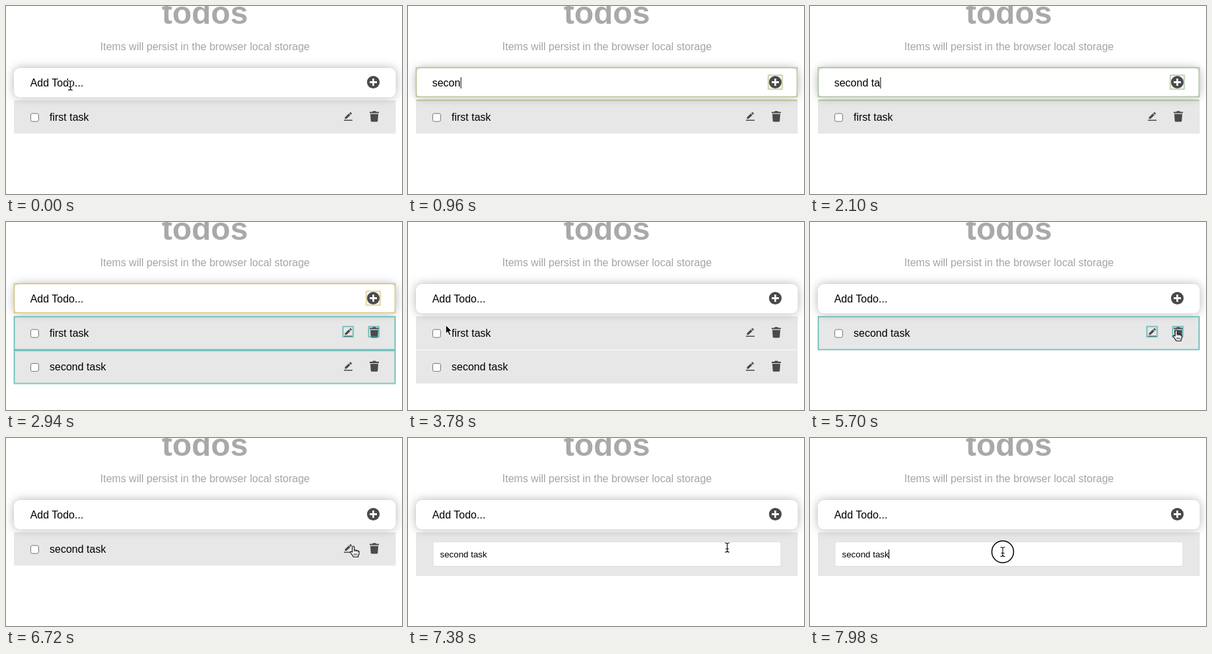
Write an HTML page that moves like this. It is 600 by 285 pixels and loops after 8000 ms.

```html
<!DOCTYPE html>
<html lang="en">
<head>
<meta charset="utf-8">
<title>todos</title>
<style>
  html, body { margin: 0; width: 100%; height: 100%; overflow: hidden; background: #fff; }
  svg { display: block; width: 600px; height: 285px; }
  text { font: 16px "Liberation Sans", Arial, sans-serif; white-space: pre; }
  .title { font-size: 48px; font-weight: bold; fill: #a9a9a9; }
  .sub { fill: #a4a4a4; }
  .edit { font-size: 13.333px; }
  .done { font-style: italic; fill: #a4a4a4; text-decoration: line-through; }
  .card { fill: #fff; filter: drop-shadow(0 0 7px rgba(0, 0, 0, .3)); }
  .row { fill: #e7e7e7; }
  .icon { fill: #4a4a4a; }
</style>
</head>
<body>
<svg viewBox="0 0 600 285">
  <text class="title" x="301.3" y="27" text-anchor="middle">todos</text>
  <text class="sub" x="301.5" y="67" text-anchor="middle">Items will persist in the browser local storage</text>
  <g id="list"></g>
  <rect class="card" x="12" y="94" width="578.5" height="44.5" rx="9"/>
  <g id="form"></g>
  <g id="rows"></g>
  <g id="marks"></g>
  <g id="pointer"></g>
</svg>
<script>
const LOOP = 8000, TICK = 60, HOLD = 300, ROW_STEP = 51.4;
const HEAT = ['#37afa9', '#63b19e', '#80b393', '#97b488', '#abb67d', '#beb771', '#cfb965'];

const TYPED = 'second task';
const KEYS = [540, 660, 780, 900, 960, 1560, 1740, 1920, 2100, 2280, 2580];
const ENTER = 2880, CHECK = 4140, REMOVE = 5640, EDIT = 6960, FOCUS = 7860;
const ROW_HITS = [ENTER, CHECK, REMOVE, EDIT];
const CLICKS = [[240, 480], [4020, 4200], [5580, 5690], [6780, 6960], [7860, 8000]];

// pointer stops: time, x, y
const PATH = [
  [0, 97.5, 120.5], [3240, 97.5, 120.5], [4020, 45.5, 166.5], [4740, 45.5, 166.5],
  [5100, 230, 189], [5520, 555, 164.5], [6100, 555, 164.5], [6660, 526.5, 164.5],
  [7200, 526.5, 164.5], [7860, 292, 172.5], [8000, 292, 172.5]
];

const BEAM = 'M-3-7Q0-7 0-5Q0-7 3-7M0-5V5M-3 7Q0 7 0 5Q0 7 3 7M-2 2H2';
const SHAPES = {
  beam: `<g fill="none" stroke-linecap="round">
    <path d="${BEAM}" stroke="#fff" stroke-width="3"/>
    <path d="${BEAM}" stroke="#000" stroke-width="1.1"/></g>`,
  arrow: '<path d="M0 0V13.2L3 10.5L5.2 15.6L7.6 14.6L5.4 9.6H9.4Z" fill="#000" stroke="#fff"/>',
  hand: `<path d="M-1.8 8.5V1a1.5 1.5 0 0 1 3 0V5.4l2.6.2 2.4.7 2.2 1v4.2l-1.3 2.8v1.4h-7.2l-1-1.8-3.5-4.4
    c-.8-1.3.5-2.3 1.5-1.5z" fill="#fff" stroke="#000" stroke-width="1.1" stroke-linejoin="round"/>
    <path d="M1.2 5.6V8M3.8 6V8.3M6.3 7V8.6M1 10.5v3M3.1 10.5v3M5.2 10.5v3" stroke="#000" stroke-width=".8"/>`
};

const $ = id => document.getElementById(id);
const text = (x, y, s, cls = '') => `<text x="${x}" y="${y}" class="${cls}">${s}</text>`;
const caret = (x, y, h) => `<path d="M${x} ${y}v${h}" stroke="#000"/>`;

const measure = document.createElement('canvas').getContext('2d');
function widthOf(s, size) {
  measure.font = `${size}px "Liberation Sans", Arial, sans-serif`;
  return measure.measureText(s).width;
}

// thin line with a soft edge on both sides
function outline(x, y, w, h, color) {
  const d = `M${x} ${y}h${w}v${h}h${-w}z`;
  return `<g fill="none" stroke="${color}"><path d="${d}" stroke-width="2.6" opacity=".35"/>
    <path d="${d}" opacity=".6"/></g>`;
}

// colour of an update mark: warmer for each quick repeat
function heat(hits, t) {
  let last = -Infinity, n = 0;
  for (const h of hits) {
    if (h > t) break;
    n = h - last <= HOLD ? n + 1 : 0;
    last = h;
  }
  return t - last < HOLD ? HEAT[Math.min(n, HEAT.length - 1)] : null;
}

function checkbox(y, on) {
  const tint = on ? '#0b66d0' : '#fff', edge = on ? '#0b66d0' : '#767676';
  return `<rect x="37.5" y="${y - 6}" width="12" height="12" rx="2.3" fill="${tint}" stroke="${edge}"/>` +
    (on ? `<path d="M40.2 ${y}l2.6 2.8l4.6-6" fill="none" stroke="#fff" stroke-width="1.9"/>` : '');
}

function icons(y) {
  return `<g class="icon" transform="translate(0 ${y})">
    <path d="M512 3.1h13v1.5h-13zM513.5 1.6v-2.3l5.9-5.7l2.4 2.4l-5.9 5.6zM520.1-7l1.2-1.2q.6-.5 1.2 0l1.3 1.3q.5.6 0 1.1l-1.2 1.2z"/>
    <path d="M551-9h4l1-1.2h4l1 1.2h4v2.1h-14zM552-5.7h12l-.7 10.2q-.1 1.5-1.6 1.5h-7.4q-1.5 0-1.6-1.5z"/></g>`;
}

function task(y, label, done) {
  return checkbox(y, done) + text(66, y + 5, label, done ? 'done' : '') + icons(y + .4);
}

function iconMarks(top, color) {
  return outline(510.5, top + 15.5, 15.5, 15.5, color) + outline(549.5, top + 15.5, 15.5, 15.5, color);
}

function pointerAt(t) {
  let i = 1;
  while (i < PATH.length - 1 && PATH[i][0] < t) i++;
  const [t0, x0, y0] = PATH[i - 1], [t1, x1, y1] = PATH[i];
  const k = Math.min(1, (t - t0) / (t1 - t0)), e = k * k * (3 - 2 * k);
  return [x0 + (x1 - x0) * e, y0 + (y1 - y0) * e];
}

function pointerShape(t, x, y) {
  if (y < 138) return 'beam';
  if (t >= EDIT) return x < 565 && y > 157 ? 'beam' : 'arrow';
  return x > 548 || (x > 510 && x < 530) ? 'hand' : 'arrow';
}

function draw(t) {
  const count = KEYS.filter(k => k <= t).length;
  const entry = t < ENTER ? TYPED.slice(0, count) : '';
  const editing = t >= EDIT;

  const tasks = t < ENTER ? ['first task'] : t < REMOVE ? ['first task', TYPED] : [TYPED];
  const tops = tasks.map((_, i) => 143 + ROW_STEP * i);

  $('list').innerHTML = tops.map(y =>
    `<rect class="row" x="12" y="${y}" width="578.5" height="${editing ? 66 : 50.5}"/>`).join('');

  $('form').innerHTML = text(36.7, 122, entry || 'Add Todo...') +
    (t >= 300 && t < ENTER ? caret(37.5 + widthOf(entry, 16), 108, 17) : '') +
    `<circle class="icon" cx="556.5" cy="115.5" r="9.6"/>
     <path d="M551 115.5h11M556.5 110v11" stroke="#fff" stroke-width="2.8"/>`;

  $('rows').innerHTML = editing
    ? '<rect x="38" y="157.5" width="527" height="37" fill="#fff" stroke="#ddd"/>' +
      text(48.5, 181, TYPED, 'edit') +
      (t >= FOCUS ? caret(48.5 + widthOf(TYPED, 13.333), 169, 14) : '')
    : tasks.map((s, i) => task(169 + ROW_STEP * i, s, i === 0 && t >= CHECK && t < REMOVE)).join('');

  let marks = '';
  const formHeat = heat([...KEYS, ENTER], t), rowHeat = heat(ROW_HITS, t);
  if (formHeat) {
    marks += outline(12.5, 93.5, 577, 44, formHeat) + outline(546, 105, 21, 21, formHeat);
    if (!rowHeat) marks += outline(12.5, 142.8, 577, 0, formHeat);
  }
  if (rowHeat) {
    marks += tops.map(y => outline(12.5, y + .5, 577, editing ? 65 : 50, rowHeat)).join('');
    if (!editing) marks += iconMarks(tops[0], rowHeat);
  }
  $('marks').innerHTML = marks;

  const [x, y] = pointerAt(t);
  const hidden = t >= KEYS[0] && t < 3240;
  const ring = CLICKS.some(([a, b]) => t >= a && t < b)
    ? '<circle r="16.5" fill="#fff" fill-opacity=".6" stroke="#000" stroke-width="1.5"/>' : '';
  $('pointer').innerHTML = hidden ? '' :
    `<g transform="translate(${x} ${y})">${ring}${SHAPES[pointerShape(t, x, y)]}</g>`;
}

const start = performance.now();
let shown = -1;
function frame() {
  const t = Math.floor((performance.now() - start) % LOOP / TICK) * TICK;
  if (t !== shown) draw(shown = t);
  requestAnimationFrame(frame);
}
frame();
</script>
</body>
</html>
```
